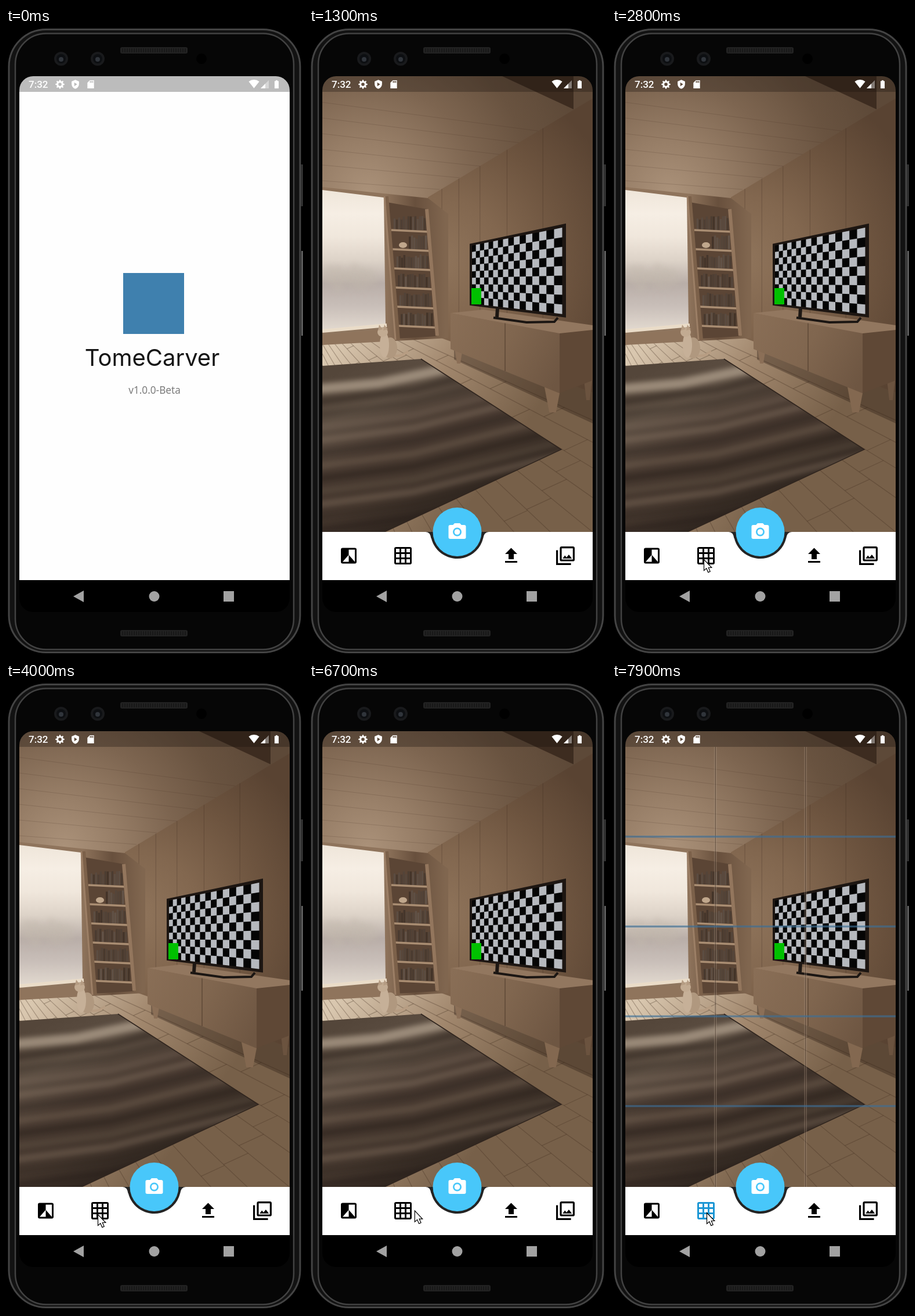
Recreate the animation shown at these times as an HTML page with a canvas. Size 512 by 1080 pixels, loop 8 s.

```html
<!DOCTYPE html>
<html lang="en">
<head>
<meta charset="utf-8">
<title>Scanner app</title>
<style>
  html, body { margin: 0; width: 100%; height: 100%; overflow: hidden; background: #000; }
  canvas { display: block; width: 512px; height: 1080px; }
</style>
</head>
<body>
<canvas id="stage" width="512" height="1080"></canvas>
<script>
const W = 512, H = 1080, LOOP = 8000, STEP = 100;
const LEFT = 23, TOP = 83, RIGHT = 489, BAR = 868, NAV = 951;
const VANISH = { x: -39, y: 438 };
const stage = document.getElementById('stage').getContext('2d');
let g;

function layer(draw) {
  const c = document.createElement('canvas');
  c.width = W; c.height = H;
  g = c.getContext('2d');
  draw();
  return c;
}
const lerp = (a, b, p) => a + (b - a) * p;
const clamp = p => Math.min(1, Math.max(0, p));
let seed = 11;
const rnd = () => (seed = seed * 16807 % 2147483647) / 2147483647;

function trace(pts) {
  g.beginPath();
  for (let i = 0; i < pts.length; i += 2) g.lineTo(pts[i], pts[i + 1]);
}
function poly(fill, ...pts) { trace(pts); g.fillStyle = fill; g.fill(); }
function line(color, width, ...pts) {
  trace(pts);
  g.strokeStyle = color;
  g.lineWidth = width;
  g.stroke();
}
function rect(fill, x, y, w, h) { g.fillStyle = fill; g.fillRect(x, y, w, h); }
function disc(fill, x, y, rx, ry = rx) {
  g.beginPath();
  g.ellipse(x, y, rx, ry, 0, 0, 7);
  g.fillStyle = fill;
  g.fill();
}
function box(x, y, w, h, r, fill, stroke, width) {
  g.beginPath();
  g.roundRect(x, y, w, h, r);
  if (fill) { g.fillStyle = fill; g.fill(); }
  if (stroke) { g.strokeStyle = stroke; g.lineWidth = width; g.stroke(); }
}
function stops(f, colors) {
  colors.forEach((c, i) => f.addColorStop(i / (colors.length - 1), c));
  return f;
}
const fade = (x0, y0, x1, y1, ...colors) => stops(g.createLinearGradient(x0, y0, x1, y1), colors);
const glow = (x, y, r, ...colors) => stops(g.createRadialGradient(x, y, 0, x, y, r), colors);
function text(str, x, y, font, color, align = 'center') {
  g.font = font;
  g.textAlign = align;
  g.fillStyle = color;
  g.fillText(str, x, y);
}

// Height at column x on the ray of slope s that leaves the vanishing point.
const ray = (x, s) => VANISH.y + s * (x - VANISH.x);
function face(fill, x0, x1, s0, s1) {
  poly(fill, x0, ray(x0, s0), x1, ray(x1, s0), x1, ray(x1, s1), x0, ray(x0, s1));
}
// Column at part u of the way between x0 and x1, shortened with depth.
const column = (x0, x1, u) => VANISH.x + 1 / lerp(1 / (x0 - VANISH.x), 1 / (x1 - VANISH.x), u);

// Icons are drawn on a 24-unit square.
function icon(cx, cy, size, draw) {
  g.save();
  g.translate(cx - size / 2, cy - size / 2);
  g.scale(size / 24, size / 24);
  draw();
  g.restore();
}
function gearIcon() {
  trace(Array.from({ length: 64 }, (_, i) => {
    const tooth = i >> 1, a = (tooth - .5) * Math.PI / 16, r = tooth % 4 < 2 ? 11 : 8;
    return 12 + r * (i % 2 ? Math.sin(a) : Math.cos(a));
  }));
  g.closePath();
  g.moveTo(16, 12);
  g.arc(12, 12, 4, 0, 7);
  g.fill('evenodd');
}
function shieldIcon() {
  g.fill(new Path2D('M12 1L3 5v6c0 6 4 11 9 12 5-1 9-6 9-12V5zM9.5 7.5l7 4.5-7 4.5z'), 'evenodd');
}
function cardIcon() {
  g.beginPath();
  g.moveTo(4, 8);
  g.lineTo(10, 2);
  g.lineTo(20, 2);
  g.lineTo(20, 22);
  g.lineTo(4, 22);
  for (let i = 0; i < 3; i++) g.rect(10 + i * 3, 4, 2, 4);
  g.fill('evenodd');
}
function wifiIcon() {
  g.beginPath();
  g.moveTo(12, 21);
  g.arc(12, 21, 18.5, -2.24, -.9);
  g.fill();
}
function batteryIcon() {
  g.fillRect(10, 2, 4, 3);
  g.fillRect(7, 4, 10, 18);
}
function contrastIcon() {
  box(3, 3, 18, 18, 2, '#000');
  poly('#fff', 5, 19, 12, 11, 12, 19);
  poly('#fff', 12, 5, 19, 5, 19, 19, 12, 11);
}
function uploadIcon() {
  rect('#000', 5, 18, 14, 2);
  rect('#000', 9, 9, 6, 7);
  poly('#000', 5, 10, 12, 3, 19, 10);
}
function galleryIcon() {
  line('#000', 2, 3, 6, 3, 21, 18, 21);
  box(7, 3, 14, 14, 1, null, '#000', 2);
  poly('#000', 9, 15, 11.5, 11.7, 13.2, 13.9, 15.7, 10.8, 19, 15);
}
function cameraIcon() {
  box(2, 4, 20, 16, 2, '#fff');
  poly('#fff', 7, 4.2, 9, 2, 15, 2, 17, 4.2);
  disc('#48c7fa', 12, 12, 5);
  disc('#fff', 12, 12, 3.2);
}
function gridIcon(color) {
  g.beginPath();
  g.roundRect(2, 2, 20, 20, 2);
  for (let i = 0; i < 9; i++) g.rect(4 + i % 3 * 6, 4 + Math.floor(i / 3) * 6, 4, 4);
  g.fillStyle = color;
  g.fill('evenodd');
}

function statusBar(back) {
  rect(back, LEFT, TOP, RIGHT - LEFT, 27);
  text('7:32', 39, 103, '500 17px Roboto, sans-serif', '#fff', 'left');
  icon(93, 97, 17, gearIcon);
  icon(119.5, 97, 17, shieldIcon);
  icon(146, 97, 17, cardIcon);
  icon(427.5, 96.5, 19, wifiIcon);
  poly('rgba(255,255,255,.4)', 439, 104, 453, 104, 453, 90);
  poly('#fff', 439, 104, 447, 104, 447, 96);
  icon(466.5, 97, 17, batteryIcon);
}
function navBar() {
  rect('#000', LEFT, NAV, RIGHT - LEFT, 55);
  poly('#a2a2a2', 116, 979, 134, 969, 134, 989);
  disc('#a2a2a2', 255.5, 979, 9);
  rect('#a2a2a2', 375, 970, 18, 18);
}

function drawPhone() {
  rect('#000', 0, 0, W, H);
  rect('#2e2e2e', 508, 235, 4, 72);
  rect('#5a5a5a', 509, 384, 3, 146);
  box(5, 2.5, 502, 1073, 64, '#121212', '#444', 3);
  box(16, 9.5, 480, 1061, 53, '#060606', '#424242', 2.5);
  for (const x of [95, 158]) {
    disc('#191a1c', x, 53, 12);
    disc('#0d0f12', x, 53, 8);
    disc('#30353b', x, 54, 4);
  }
  disc('#000', 337, 53, 9);
  for (const y of [33, 1037]) {
    box(197, y, 116, 11, 3, '#222');
    for (let x = 200; x < 311; x += 4) rect('#181818', x, y + 2, 2, 7);
  }
}

function drawSplash() {
  rect('#fefefe', LEFT, TOP, RIGHT - LEFT, NAV - TOP);
  statusBar('#bcbcbc');
  rect('#3f80ae', 202, 422, 105, 105);
  text('TomeCarver', 252, 582, '40px Inter, sans-serif', '#151515');
  text('v1.0.0-Beta', 256, 630, '17.2px "Noto Sans", sans-serif', '#7b7b7b');
  navBar();
}

function drawFloor() {
  rect(fade(50, 545, 330, 745, '#d9c7af', '#a1876d', '#776049'), LEFT, 525, 466, BAR - 525);
  const seam = 'rgba(60,42,28,.3)', tilt = .46;
  for (let s = .45; s < 2.4; s *= 1.16) {
    const next = s * 1.16;
    line(seam, 1.3, LEFT, ray(LEFT, s), RIGHT, ray(RIGHT, s));
    for (let x = 40 + rnd() * 90; x < 540; x += 100) {
      const y = ray(x, s), far = (y + tilt * x - ray(0, next)) / (next + tilt);
      line(seam, 1.3, x, y, far, ray(far, next));
    }
  }
}
function drawShell() {
  rect(glow(100, 285, 380, '#ab927a', '#967d66', '#7d6550', '#695340', '#5d4938'), LEFT, TOP, 466, 225);
  for (let i = 0; i < 6; i++)
    line('rgba(60,42,28,.18)', 1, LEFT, 128 + i * 27, 400 - i * 35, 178 + i * 20);
  face(glow(225, 400, 330, '#8f745b', '#82674f', '#6d543f', '#594332'), 205, RIGHT, -.6, .36);
  poly('#3d2c20', 333, TOP, 456, 140, 456, TOP);
  for (let i = 1; i < 6; i++) {
    const x = column(205, RIGHT, i / 6);
    line('rgba(45,30,20,.25)', 1, x, ray(x, -.6), x, ray(x, .3));
  }
  poly(fade(131, 300, 235, 300, '#8f745c', '#68503d', '#80664f'), LEFT, 274, 205, 293, 240, 320, 240, 534, LEFT, 546);
}
function drawWindow() {
  poly(fade(0, 280, 0, 520, '#efe6da', '#f6eee4', '#f0e7dc', '#ddd3c8', '#b9aea8', '#c9bfb9', '#e2d9cf'),
    LEFT, 279, 129, 292, 132, 511, LEFT, 522);
  g.filter = 'blur(4px)';
  for (let x = 36; x < 120; x += 14)
    disc('rgba(196,184,173,.4)', x, 424 + rnd() * 12, 11, 12 + rnd() * 14);
  g.filter = 'none';
  line('#eadcc8', 6, LEFT, 522, 134, 512);
  line('#8d7660', 1.5, LEFT, 527, 134, 517);
}
function drawShelf() {
  const lean = y => (y - 312) * .075;
  poly('#5b4535', 134, 300, 203, 312, 220, 531, 152, 535);
  for (let i = 0; i < 6; i++) {
    const y = 348 + i * 33, left = 139 + lean(y), right = 203 + lean(y);
    for (let x = i === 1 ? 172 : left + 4; x < right - 6; x += 4) {
      const h = 18 + rnd() * 6, tone = 48 + rnd() * 32;
      rect(`rgb(${tone + 18},${tone + 3},${tone - 8})`, x, y - h, 3.4, h);
    }
    line('#a98d72', 3.5, left, y, right, y + 3);
  }
  disc('#c0a78c', 162, 374, 7, 5);
  line('#7c614a', 8, 133, 290, 153, 537);
  line('#9c7f66', 3, 130, 290, 149, 537);
  line('#93765d', 6, 203, 312, 221, 530);
}
function drawRug() {
  g.save();
  poly(fade(100, 570, 220, 850, '#54463a', '#5e5044', '#483a31', '#43362d', '#2d241e'),
    LEFT, 582, 193, 570, 435, 726, 130, BAR, LEFT, BAR);
  g.clip();
  g.filter = 'blur(4px)';
  line('rgba(190,172,153,.65)', 17, LEFT - 10, 622, 120, 612, 260, 582);
  for (let y = 645; y < 900; y += 22) {
    const tone = rnd() < .5 ? '140,120,102' : '32,24,19';
    line(`rgba(${tone},${.15 + rnd() * .25})`, 11, LEFT - 10, y, 180, y - 22, 450, y - 90);
  }
  g.restore();
  line('#30251e', 1.5, 193, 570, 435, 726, 130, BAR);
}
function drawCat() {
  line('#b79d83', 4, 145, 565, 160, 564, 171, 557);
  disc('#b0987f', 140, 551, 12, 18);
  disc('#c6b098', 130, 546, 8, 22);
  disc('#c2ab92', 127, 524, 9, 8);
  for (const x of [119, 128]) poly('#b59c83', x, 521, x + 2, 511, x + 8, 519);
}
function leg(fill, x, y, w, h) {
  poly(fill, x - w / 2, y, x + w / 2, y, x + w / 5, y + h, x - w / 5, y + h);
}
function drawCabinet() {
  face('rgba(40,27,18,.35)', 250, RIGHT, .36, .46);
  leg('#8b6f57', 258, 552, 14, 26);
  leg('#836850', 420, 616, 29, 46);
  leg('#6b533f', 481, 602, 15, 39);
  poly('#92775f', 244, 491, 300, 485, RIGHT, 512, RIGHT, 521, 432, 527);
  face(fade(244, 500, 432, 600, '#896e56', '#80664f', '#6e5642'), 244, 432, .187, .406);
  poly('#5f4836', 432, 526, RIGHT, 520, RIGHT, 607, 432, 629);
  line('rgba(45,30,20,.5)', 1.2, 338, ray(338, .187), 338, ray(338, .406));
}
function drawTv() {
  line('#1d1713', 6, 325, 482, 324, 498);
  line('#1b1613', 4, 318, 499, 375, 507, 423, 506, 429, 499);
  face('#1d1612', 277, 443, -.21, .126);
  const x0 = 281, x1 = 436.5, top = -.198, bottom = .115, cols = 16, rows = 9;
  face('#050505', x0, x1, top, bottom);
  for (let r = 0; r < rows; r++)
    for (let c = 1 - r % 2; c < cols; c += 2)
      face('#b6b9be', column(x0, x1, c / cols), column(x0, x1, (c + 1) / cols),
        lerp(top, bottom, r / rows), lerp(top, bottom, (r + 1) / rows));
  rect('#00c000', 280, 448, 17, 28);
}
function bottomBar() {
  rect('#fff', LEFT, BAR, RIGHT - LEFT, NAV - BAR);
  g.beginPath();
  g.moveTo(201, BAR);
  g.quadraticCurveTo(209, BAR, 210.5, 879);
  g.arc(255.5, BAR, 46, Math.PI - .24, .24, true);
  g.quadraticCurveTo(302, BAR, 310, BAR);
  g.fillStyle = '#242424';
  g.fill();
  icon(68.5, 909, 36, contrastIcon);
  icon(348.5, 909, 36, uploadIcon);
  icon(442, 909, 38.4, galleryIcon);
}
function drawCamera() {
  for (const part of [drawFloor, drawShell, drawWindow, drawShelf, drawRug, drawCat, drawCabinet, drawTv]) part();
  statusBar('rgba(20,14,10,.3)');
  bottomBar();
  navBar();
}

function drawGuides() {
  for (let i = 1; i < 3; i++) {
    const x = LEFT + 155.3 * i;
    rect('rgba(60,45,35,.4)', x - 1, 110, 2, BAR - 110);
    for (const d of [-2, 1]) rect('rgba(190,168,148,.5)', x + d, 110, 1, BAR - 110);
  }
  for (let i = 1; i < 5; i++) {
    const y = 110 + 154.7 * i;
    rect('rgba(82,100,115,.5)', LEFT, y - 1, 466, 2);
    for (const d of [-1.5, .5]) rect('rgba(50,118,172,.75)', LEFT, y + d, 466, 1);
  }
}

function cursorAt(t) {
  if (t < 6600) {
    const p = 1 - (1 - clamp((t - 2000) / 800)) ** 2;
    return [lerp(386, 158, p), lerp(1044, 915, p)];
  }
  // A quick sweep to the right and back to the grid button.
  const p = clamp((t - 6600) / 400);
  return [lerp(158, 163, p) + 45 * Math.sin(Math.PI * p ** 1.29),
          lerp(915, 912, p) - 8 * Math.sin(Math.PI * p)];
}
const arrow = new Path2D('M.5 .5V19.5L4.8 15.8L7.8 22.6L11.2 21.2L8.3 14.5H13.8Z');
function drawCursor([x, y]) {
  g.save();
  g.translate(x, y);
  g.fillStyle = '#fff';
  g.fill(arrow);
  g.strokeStyle = '#000';
  g.lineWidth = 1.2;
  g.stroke(arrow);
  g.restore();
}

const phone = layer(drawPhone), splash = layer(drawSplash), camera = layer(drawCamera);
g = stage;

function render(now) {
  const t = Math.floor(now % LOOP / STEP) * STEP;
  const ready = t >= 1000, gridOn = t >= 7400;
  g.drawImage(phone, 0, 0);
  g.save();
  g.beginPath();
  g.roundRect(LEFT, TOP, RIGHT - LEFT, 923, 24);
  g.clip();
  g.drawImage(ready ? camera : splash, 0, 0);
  if (ready) {
    if (gridOn) drawGuides();
    icon(162, 909, 36, () => gridIcon(gridOn ? '#1b96d4' : '#000'));
    disc('#48c7fa', 255.5, BAR, 42);
    icon(255.5, BAR, 36, cameraIcon);
  }
  g.restore();
  if (t >= 2000) drawCursor(cursorAt(t));
}

const start = performance.now();
function tick() {
  render(performance.now() - start);
  requestAnimationFrame(tick);
}
tick();
</script>
</body>
</html>
```
